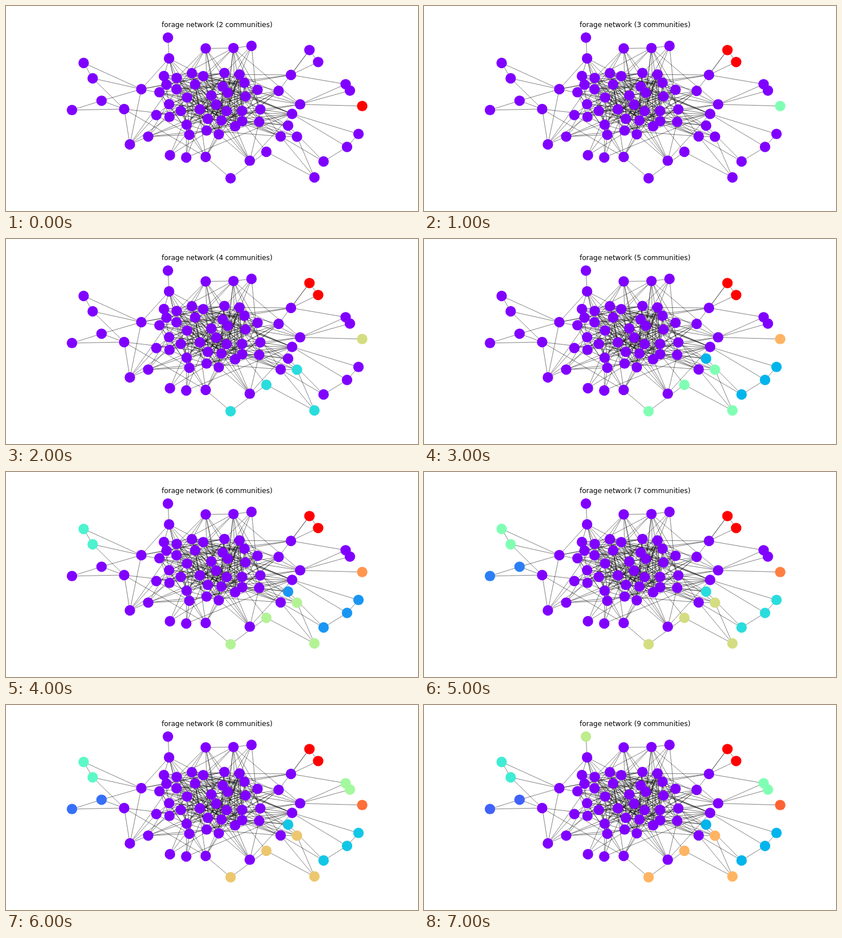
Animation of 720 by 360 pixels, one loop 8000 ms. Source, as an HTML page with a canvas:

```html
<!DOCTYPE html>
<html lang="en">
<head>
<meta charset="utf-8">
<title>Network communities</title>
<style>
  html, body { margin: 0; width: 100%; height: 100%; overflow: hidden; background: #fff; }
  canvas { display: block; width: 720px; height: 360px; }
</style>
</head>
<body>
<canvas id="stage" width="720" height="360"></canvas>
<script>
const ctx = document.getElementById('stage').getContext('2d');
const STEP = 1000, STEPS = 8, RADIUS = 9.16;
const CENTER = [358, 170], INNER_COUNT = 34;

// Groups in colour order; `from` is the community count at which each splits off.
// The first point of a group is its gateway to the core.
const groups = [
  { from: 7, points: [[167, 166.3], [115.3, 182.7]] },
  { from: 5, points: [[493, 210], [555, 273], [596, 247.5], [616, 224.7]] },
  { from: 6, points: [[151.5, 127], [135.7, 100]] },
  { from: 8, points: [[593.5, 137.3], [601, 148.5]] },
  { from: 9, points: [[283, 55.5]] },
  { from: 4, points: [[508.5, 229.5], [539, 301], [455, 256], [392.5, 302.5]] },
  { from: 2, points: [[622.5, 175.7]] },
  { from: 3, points: [[530.3, 77.3], [545.5, 98.3]] }
];

// Outline of the core, clockwise from the top.
const rim = [
  [349, 74.5], [397.5, 73.8], [429, 70], [498, 121], [476.5, 149], [514, 172.7],
  [500, 189.5], [480, 229], [426, 271.7], [349, 265], [315, 266], [286.5, 262],
  [216.5, 243], [248.5, 229.3], [206.5, 181], [236.5, 146], [276, 123], [285, 92]
];

function seededRandom(seed) {
  return () => {
    seed = (Math.imul(seed, 1664525) + 1013904223) >>> 0;
    return seed / 4294967296;
  };
}

const random = seededRandom(27);
const jitter = size => (random() - 0.5) * size;
const distance = ([ax, ay], [bx, by]) => Math.hypot(ax - bx, ay - by);
const mix = (a, b, t) => a.map((v, i) => v + (b[i] - v) * t);

// Sunflower spiral squeezed into an ellipse.
const inner = Array.from({ length: INNER_COUNT }, (_, i) => {
  const r = Math.sqrt((i + 0.5) / INNER_COUNT), angle = i * 2.39996;
  return [
    CENTER[0] + 106 * r * Math.cos(angle) + jitter(14),
    CENTER[1] + 64 * r * Math.sin(angle) + jitter(14)
  ];
});
const core = [...rim, ...inner];

function coreEdges() {
  const pull = ([x, y]) => Math.exp(-(((x - 385) / 130) ** 2) - ((y - 165) / 85) ** 2);
  return core.flatMap((a, i) => core.slice(i + 1)
    .filter(b => {
      const chance = 0.13 + 0.42 * pull(a) * pull(b);
      return random() < chance * Math.exp(-((distance(a, b) / 190) ** 2));
    })
    .map(b => [a, b]));
}

// Members form a chain and reach for the core nodes that lie on their way inward.
function groupEdges({ points }) {
  return points.flatMap((point, i) => {
    const aim = mix(point, CENTER, 1 / 3);
    const nearest = [...core].sort((a, b) => distance(a, aim) - distance(b, aim));
    const ties = nearest.slice(0, i ? 1 : points.length).map(node => [point, node]);
    return i ? [...ties, [points[i - 1], point]] : ties;
  });
}

const edges = [...coreEdges(), ...groups.flatMap(groupEdges)];

function rainbow(x) {
  const channels = [Math.abs(2 * x - 0.5), Math.sin(Math.PI * x), Math.cos(Math.PI * x / 2)];
  return `rgb(${channels.map(c => Math.round(255 * Math.min(1, Math.max(0, c)))).join(',')})`;
}

function drawNodes(points, color) {
  ctx.fillStyle = color;
  for (const [x, y] of points) {
    ctx.beginPath();
    ctx.arc(x, y, RADIUS, 0, 2 * Math.PI);
    ctx.fill();
  }
}

function draw(count) {
  ctx.fillStyle = '#fff';
  ctx.fillRect(0, 0, 720, 360);

  ctx.strokeStyle = '#000';
  ctx.lineWidth = 0.5;
  for (const [a, b] of edges) {
    ctx.beginPath();
    ctx.moveTo(...a);
    ctx.lineTo(...b);
    ctx.stroke();
  }

  drawNodes(core, rainbow(0));
  let rank = 0;
  for (const { from, points } of groups) {
    drawNodes(points, rainbow(from <= count ? ++rank / (count - 1) : 0));
  }

  ctx.fillStyle = '#000';
  ctx.font = '12px "DejaVu Sans", sans-serif';
  ctx.fillText(`forage network (${count} communities)`, 272, 37);
}

function tick() {
  draw(2 + Math.floor(performance.now() / STEP) % STEPS);
  requestAnimationFrame(tick);
}
tick();
</script>
</body>
</html>
```
